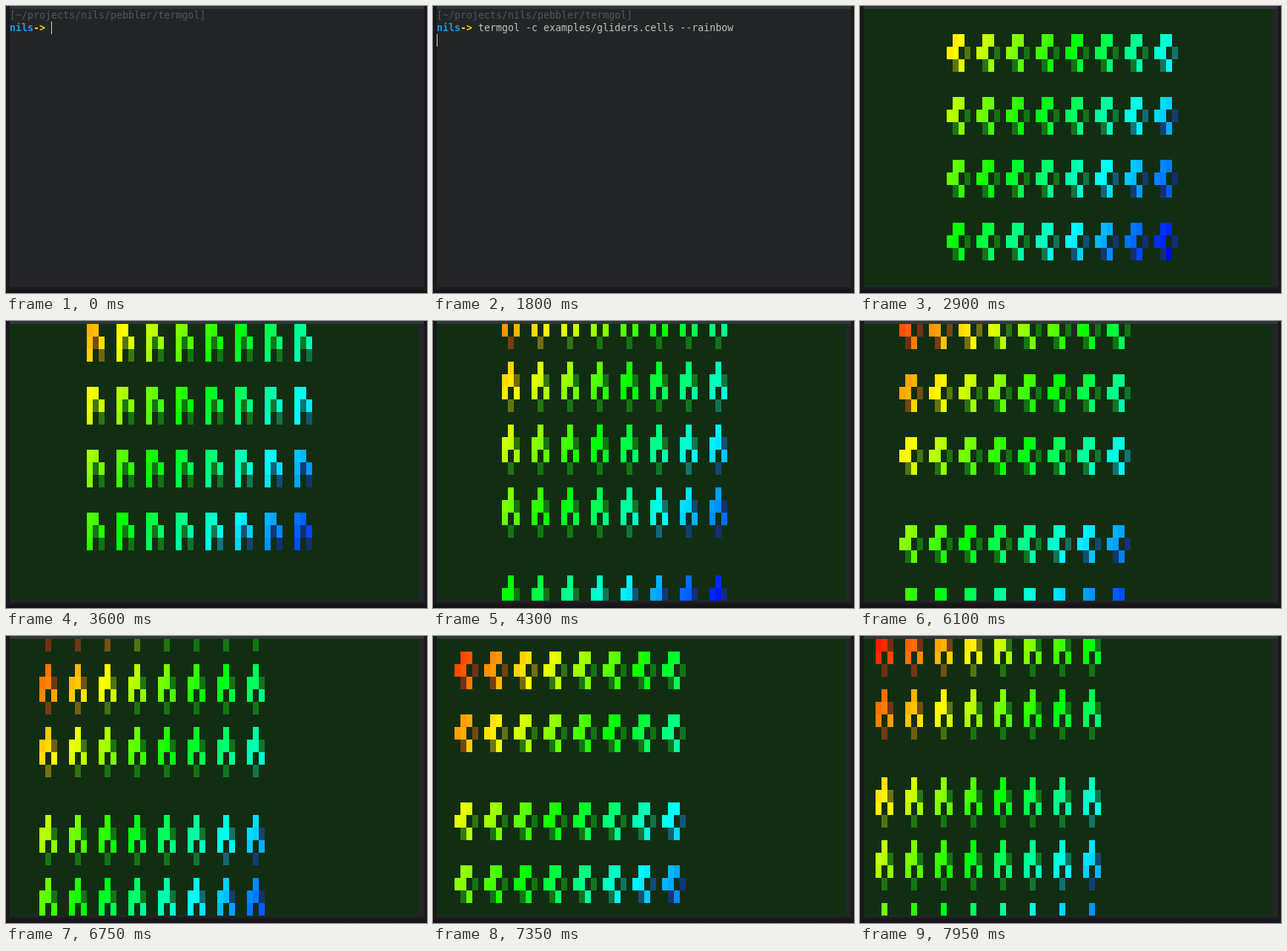
An HTML page with a canvas for the animation above (8 s loop, 568 px wide and 388 px high).

```html
<!DOCTYPE html>
<html lang="en">
<head>
<meta charset="utf-8">
<title>Gliders in a terminal</title>
<style>
  html, body { margin: 0; width: 100%; height: 100%; overflow: hidden; background: #18191b; }
  canvas { display: block; }
</style>
</head>
<body>
<canvas id="stage" width="568" height="388"></canvas>
<script>
const ctx = document.getElementById('stage').getContext('2d');
const LOOP = 8000;
const LEFT = 5, TOP = 4, CELL_W = 8, CELL_H = 17, COLS = 69, ROWS = 22;
const FONT = '13.3px "DejaVu Sans Mono", monospace';
const FIELD = [18, 46, 18];
const LAST_GENERATION = 51;

const cellX = col => LEFT + col * CELL_W;
const cellY = row => TOP + row * CELL_H;
const index = (col, row) => (row + ROWS) % ROWS * COLS + (col + COLS) % COLS;

function firstGeneration() {
  const cells = new Uint8Array(COLS * ROWS);
  const glider = ['XX.', 'X.X', 'X..'];
  for (let j = 0; j < 4; j++) {
    for (let i = 0; i < 8; i++) {
      glider.forEach((line, y) => [...line].forEach((mark, x) => {
        if (mark === 'X') cells[index(15 + 5 * i + x, 2 + 5 * j + y)] = 1;
      }));
    }
  }
  return cells;
}

// Conway's rules on a torus
function evolve(cells) {
  const next = new Uint8Array(cells.length);
  for (let row = 0; row < ROWS; row++) {
    for (let col = 0; col < COLS; col++) {
      const self = cells[index(col, row)];
      let count = -self;
      for (let dy = -1; dy <= 1; dy++)
        for (let dx = -1; dx <= 1; dx++) count += cells[index(col + dx, row + dy)];
      next[index(col, row)] = count === 3 || (count === 2 && self) ? 1 : 0;
    }
  }
  return next;
}

const generations = [firstGeneration()];
while (generations.length <= LAST_GENERATION) generations.push(evolve(generations.at(-1)));

function generationAt(t) {
  if (t < 2900) return 0;
  if (t < 6750) return Math.min(38, 1 + Math.floor((t - 2900) / 100));
  return Math.min(LAST_GENERATION, 39 + Math.floor((t - 6750) / 100));
}

const rgb = channels => `rgb(${channels.map(Math.round).join(',')})`;

// Fully saturated hue as three levels from 0 to 1
function hueLevels(hue) {
  return [0, 240, 120].map(shift => {
    const h = (hue + shift) % 360;
    return Math.max(0, Math.min(1, Math.abs(h - 180) / 60 - 1));
  });
}

function cellColor(col, row, alive) {
  const levels = hueLevels(3.2 * col + 4 * row);
  return rgb(alive
    ? levels.map(v => 255 * v)
    : levels.map((v, i) => FIELD[i] + (116 - FIELD[i]) * v ** 4));
}

function rect(color, x, y, w, h) {
  ctx.fillStyle = color;
  ctx.fillRect(x, y, w, h);
}

function fade(x0, y0, x1, y1, from, to) {
  const gradient = ctx.createLinearGradient(x0, y0, x1, y1);
  gradient.addColorStop(0, from);
  gradient.addColorStop(1, to);
  return gradient;
}

function drawWindow() {
  rect('#18191b', 0, 0, 568, 388);
  rect(fade(0, 380, 0, 388, '#1d1d1f', '#121214'), 0, 380, 568, 8);
  rect('#232526', LEFT, TOP, 559, 376);
  rect('#30373a', LEFT, 0, 559, TOP);
}

function write(text, col, row, color, weight = '') {
  ctx.font = `${weight} ${FONT}`;
  ctx.fillStyle = color;
  ctx.fillText(text, cellX(col), cellY(row) + 13);
}

function drawShell(t) {
  const command = 'termgol -c examples/gliders.cells --rainbow';
  write('[~/projects/nils/pebbler/termgol]', 0, 0, '#535556');
  write('nils', 0, 1, '#2196e3', 'bold');
  write('->', 4, 1, '#f2d422', 'bold');
  if (t >= 500) write(command, 7, 1, '#bfc1c1');

  const [col, row] = t < 500 ? [7, 1] : t < 1800 ? [7 + command.length, 1] : [0, 2];
  rect('#d0d2d2', cellX(col), cellY(row), 1, CELL_H);
}

function drawLife(n) {
  const now = generations[n], before = generations[Math.max(0, n - 1)];
  rect(rgb(FIELD), LEFT, TOP, COLS * CELL_W, ROWS * CELL_H);
  for (let row = 0; row < ROWS; row++) {
    for (let col = 0; col < COLS; col++) {
      const k = index(col, row);
      if (now[k] || before[k])
        rect(cellColor(col, row, now[k]), cellX(col), cellY(row), CELL_W, CELL_H);
    }
  }
}

function frame() {
  const t = performance.now() % LOOP;
  drawWindow();
  if (t < 1850) drawShell(t);
  else drawLife(generationAt(t));
  requestAnimationFrame(frame);
}
frame();
</script>
</body>
</html>
```
